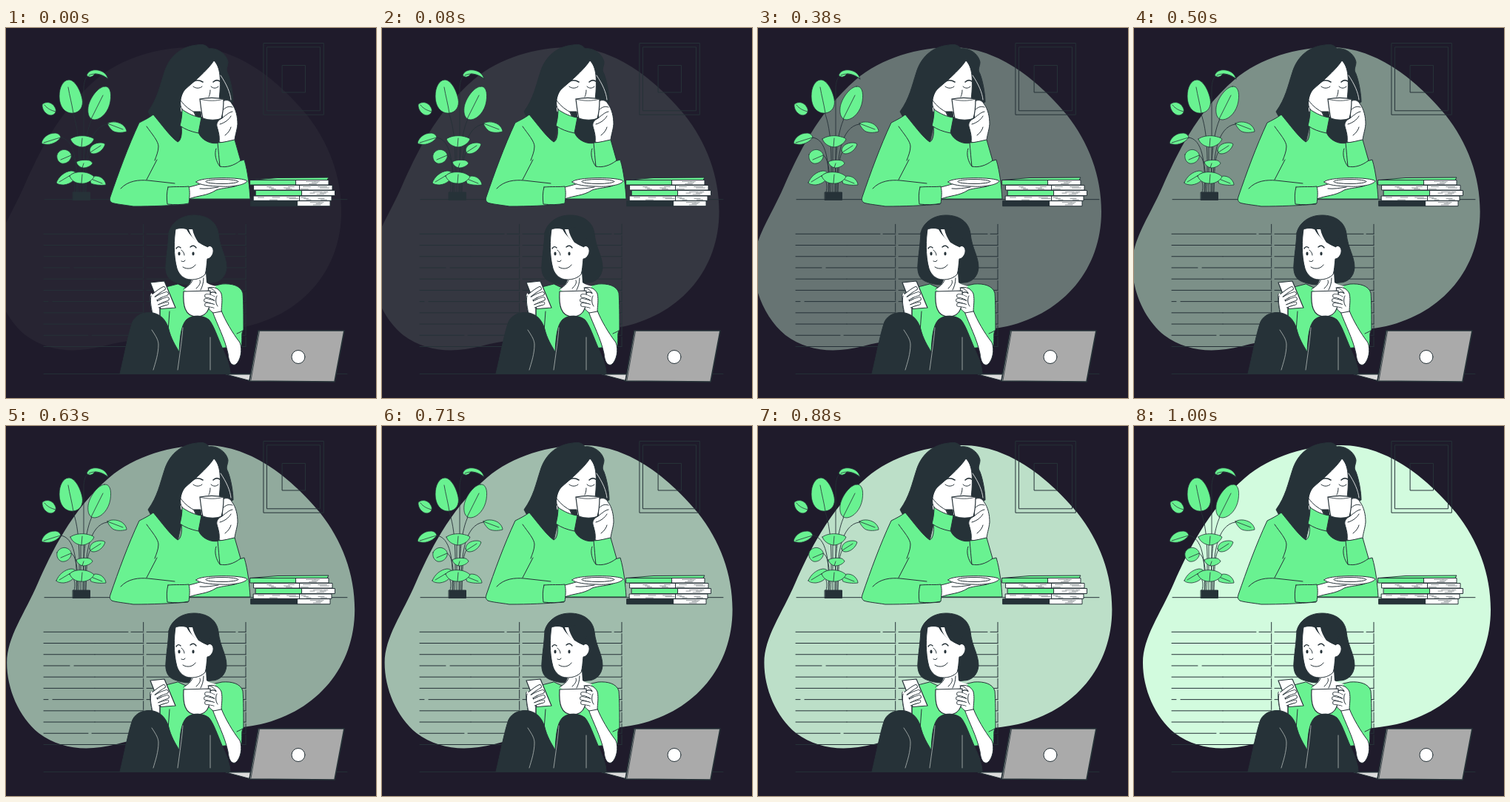
An HTML page with a canvas for the animation above (1.04 s loop, 500 by 500 pixels).

```html
<!DOCTYPE html>
<html lang="en">
<head>
<meta charset="utf-8">
<title>Coffee break</title>
<style>
html, body { margin: 0; width: 100%; height: 100%; overflow: hidden; background: #1f1b2b; }
canvas { display: block; width: 100vw; height: 100vh; }
</style>
</head>
<body>
<canvas id="stage"></canvas>
<script>
const NIGHT = '#1f1b2b', INK = '#263238', GREEN = '#69f291', MINT = '#d2fbde', WHITE = '#fff', GREY = '#aaa';
const LOOP = 1040, STEPS = 25, SLIDE = 30, SIZE = 500;

const stage = document.getElementById('stage');
const scale = Math.max(1, window.devicePixelRatio || 1);
stage.width = stage.height = SIZE * scale;
let ctx = stage.getContext('2d');
const screen = ctx;

const blob = new Path2D('M280 26C345 26 400 75 435 117C465 155 482 200 482 248C482 325 432 385 355 403' +
  'C300 414 215 415 160 430C120 440 85 437 55 415C28 393 12 355 12 320C12 285 36 254 54 212' +
  'C72 172 98 115 150 70C185 40 235 26 280 26Z');

function shape(d, fill, line = INK, width = 1) {
  const path = new Path2D(d);
  if (fill) { ctx.fillStyle = fill; ctx.fill(path); }
  if (line) { ctx.strokeStyle = line; ctx.lineWidth = width; ctx.stroke(path); }
}
const line = (d, color = INK, width = 1) => shape(d, null, color, width);

function oval(x, y, rx, ry, fill, stroke = INK) {
  ctx.beginPath();
  ctx.ellipse(x, y, rx, ry, 0, 0, 7);
  ctx.fillStyle = fill;
  ctx.fill();
  if (stroke) { ctx.strokeStyle = stroke; ctx.lineWidth = 1; ctx.stroke(); }
}

function box(x, y, w, h, fill) {
  shape(`M${x} ${y}h${w}v${h}h${-w}Z`, fill);
}

function finger(d, width = 5) {
  line(d, INK, width + 1.6);
  line(d, WHITE, width);
}

function leaf(d, rib) {
  shape(d, GREEN, INK, .8);
  line(rib, INK, .8);
}

function room() {
  box(348.3, 20.5, 81, 96.7);
  box(352.8, 25.8, 71.7, 86);
  box(373.5, 50.5, 31, 36.5);
  line('M52 231.7H461M51 467.4H461');

  const gaps = { 0: [165, 169], 3: [86, 92], 6: [57, 63], 9: [111, 116] };
  for (let i = 0; i < 11; i++) {
    const y = 278.3 + i * 15.22;
    const [a, b] = gaps[i] || [120, 120];
    line(`M51 ${y}H${a}M${b} ${y}H186`);
    line(i ? `M190 ${y}H324` : `M190 ${y}H310M314 ${y}H324`);
    line(`M185.7 ${y - 13}v11.5M324 ${y - 13}v13`);
  }
}

function plant() {
  line('M98 222C100 180 100 140 90 114M104 222C104 170 108 140 116 123M105 222V80C106 70 108 65 113 64' +
    'M95 222C97 180 92 150 74 148M107 222C106 175 112 133 137 130M108 222C109 200 108 176 114 168' +
    'M96 222C98 195 95 175 88 172M101 222V160M92 222C94 214 93 208 90 205', INK, .9);
  leaf('M109 64C111 57 120 55 128 58C134 60 137 65 138 69C133 65 126 62 120 62C117 66 113 68 109 64Z', 'M112 64C120 60 130 62 138 69');
  leaf('M84 70C92 69 100 82 103 96C105 106 100 114 91 115C81 116 72 108 72 92C72 80 77 71 84 70Z', 'M84 80C86 92 89 102 91 115');
  leaf('M133 79C140 78 143 86 141 99C139 112 130 123 120 124C112 124 110 116 111 107C113 95 124 80 133 79Z', 'M131 91L115 123');
  leaf('M49 103C55 98 63 101 66 107C69 112 67 117 61 118C54 118 48 110 49 103Z', 'M52 104C56 109 60 111 67 113');
  leaf('M137 129C143 125 154 127 159 132C162 135 163 138 163 140C156 142 147 142 143 138C140 135 138 132 137 129Z', 'M137 129L158 137');
  leaf('M48 155C50 148 57 142 66 142C70 142 73 144 74 148C70 154 60 159 52 157C50 157 48 156 48 155Z', 'M51 155C58 153 66 150 74 148');
  leaf('M87 150C92 146 101 145 108 146C113 147 117 148 119 150C117 156 109 161 102 161C95 160 89 156 87 150Z', 'M103 149L102 161');
  leaf('M113 166C113 159 120 155 128 155C131 155 133 156 134 157C132 164 125 170 118 170C115 170 113 168 113 166Z', 'M114 168L128 159');
  leaf('M69 171C71 166 77 163 82 165C87 167 89 171 88 175C86 181 80 184 75 183C70 181 68 176 69 171Z', 'M74 178L88 172');
  leaf('M95 181C99 178 108 178 113 179C115 180 117 182 117 183C114 187 109 189 104 189C99 188 96 185 95 181Z', 'M105 183L103 189');
  leaf('M68 209C71 201 79 194 88 193C92 193 94 195 95 197C95 204 88 211 78 212C73 212 69 211 68 209Z', 'M72 208L92 196');
  leaf('M113 203C119 198 127 200 131 204C134 207 135 210 135 212C128 213 119 212 115 210Z', 'M115 204L130 210');
  leaf('M86 200C90 195 98 194 106 195C113 196 117 199 119 201C116 207 108 211 101 210C94 210 88 206 86 200Z', 'M103 198L102 210');
  box(90.5, 222, 23, 10.5, INK);
}

function book(x, y, split, end, h, cover) {
  box(x, y, split - x, h, cover);
  box(split, y, end - split, h, WHITE);
  const from = cover === WHITE ? x : split;
  for (let i = 0; i < (end - from) / 11; i++) {
    const a = from + 3 + (i * 23 + y * 3) % (end - from - 17);
    line(`M${a} ${y + 2 + i % 3 * 1.6}h${6 + i % 4 * 2}`, INK, .5);
  }
}

function books() {
  shape('M330 205.5L367 202.5L436 202L434 205.5Z', GREEN);
  book(330, 205.5, 392, 436, 6.5, GREEN);
  book(335, 212.5, 397, 441, 6.5, WHITE);
  book(337.5, 219.5, 400, 444.5, 7, GREEN);
  book(334.5, 227, 397, 440, 6.3, WHITE);
  book(331, 233.7, 394, 438, 7, INK);
}

function sipper() {
  shape('M232 154C215 145 200 130 192 113C205 95 208 78 214 60C220 40 235 25 258 23C266 21 272 24 274 28' +
    'C285 26 298 35 300 46C300 53 296 55 300 62C304 72 307 90 307 100L296 105L290 130L288 155C275 159 264 152 258 142L238 130Z', INK);
  shape('M281 44C285 48 288 54 289 64C290 75 289 90 288 96L268 120L254 122L236 113C234 100 236 90 242 83C252 74 272 58 281 44Z', WHITE);
  shape('M254 113L263 113L264 122L257 120Z', INK);
  line('M240 84C235 95 234 103 238 110M236 98C242 106 249 111 255 114');
  line('M250 75C255 70 261 70 266 73M280 73C283 70 286 70 289 72', INK, 1.6);
  line('M253 79C256 82 262 82 265 79M277 79C280 82 284 82 287 79M276 84C276 88 275 91 274 93');
  line('M290 64C298 76 303 87 304 97', WHITE, .8);

  shape('M199 117C210 130 222 147 232 154C237 152 238 142 237 133L260 141C264 152 278 158 288 155L289 187' +
    'L322 178C327 195 329 215 330 231H247L246 238C220 240 200 241 172 241C160 239 148 238 143 236' +
    'C140 234 140 231 141 228C152 196 165 160 180 128C186 125 194 121 199 117Z', GREEN);
  shape('M238 110C246 116 256 120 264 121L260 142C250 140 242 137 235 132C237 125 238 117 238 110Z', GREEN);
  line('M190 133C197 143 206 153 206 160C206 167 203 173 201 179M204 178L190 205M155 217C165 206 180 205 192 206L228 210');
  line('M284 163C281 170 284 181 289 187');

  shape('M293 99C298 96 303 98 305 102C311 110 313 120 313 130C312 140 309 146 309 153C301 153 294 156 288 154C289 146 287 140 285 133C284 128 287 124 292 122Z', WHITE);
  shape('M286 155C294 155 303 152 309 151C312 160 314 170 317 179C308 186 298 189 289 187C288 178 287 165 286 155Z', GREEN);
  line('M293 111C297 107 301 105 306 107M291 122C297 119 300 114 306 113M289 130C296 128 301 124 304 119M296 145C300 142 303 138 304 134');
  shape('M262 96C272 94 284 94 294 96C294 106 293 116 291 122C285 125 274 125 266 122C264 114 263 104 262 96Z', WHITE, INK, 1.2);
  line('M262 96C272 99 285 99 294 96', INK, .8);

  shape('M247 215C256 213 262 211 268 209C280 212 300 212 312 213C305 216 292 216 284 219C272 227 260 226 247 231Z', WHITE);
  line('M262 217C270 218 279 216 287 215');
  shape('M257 208C260 201 322 201 326 207C323 212 306 215 291 214C275 214 261 212 257 208Z', WHITE);
  oval(292, 207.5, 22, 3, WHITE);
  shape('M219 215C230 214 240 215 247 214C249 221 248 230 247 237C238 239 228 239 218 238C217 230 217 222 219 215Z', GREEN);
}

function reader() {
  shape('M220 277C222 266 234 253 254 253C272 253 285 262 287 278C289 298 298 308 298 324C297 337 288 344 278 344' +
    'C260 346 245 350 228 343C218 340 215 330 216 320C217 305 219 295 220 277Z', INK);
  shape('M232 346C224 348 215 350 208 353L206 385L210 440L318 430C320 420 317 412 321 408C321 390 321 370 320 358' +
    'C317 348 305 345 292 346L283 348C270 353 255 357 245 352Z', GREEN);
  shape('M251 338L270 330L271 344C275 347 280 348 284 349C275 361 250 362 240 353C246 349 251 345 251 338Z', WHITE, null);
  shape('M229 272C234 270 240 270 245 272C250 282 261 290 272 295C276 293 281 296 280 303C279 308 275 312 272 312' +
    'C271 320 271 327 269 333C264 338 258 340 250 340C241 340 234 334 231 325C226 307 227 285 229 272Z', WHITE);
  shape('M244 271C249 282 260 291 273 296L277 284L262 269Z', INK);
  shape('M247 272C250 282 255 287 260 290C256 284 253 278 252 272Z', WHITE, null);
  oval(234, 305, 1.6, 2.4, INK, null);
  oval(253, 305, 1.6, 2.4, INK, null);
  line('M230 298C232 295 234 295 236 297M249 296C252 293 255 294 257 297', INK, 1.4);
  line('M237 300C239 302 241 304 241 307M239 323C245 327 253 325 256 320M237 315C239 316 241 316 242 314');
  line('M262 341C264 345 260 349 257 352M267 338C267 345 265 350 263 354M240 353C246 349 250 346 252 341');
  line('M221 383L219 410M312 413C316 411 319 410 321 408');

  // Hand with phone
  shape('M195 360C194 368 196 378 198 388L208 391V378L212 360Z', WHITE);
  shape('M195 344L214 342L229 378L209 379.5Z', WHITE, INK, 1.2);
  finger('M200 361C205 357 209 354 213 352', 4);
  finger('M202 366C208 362 213 360 217 359', 4);
  finger('M204 372C209 369 214 367 218 366', 4);
  finger('M206 376C211 374 215 373 218 372', 3);
  shape('M196 358C200 362 205 367 206 378L207 386L198 386C196 377 194 368 196 358Z', WHITE, null);
  line('M196 362C194 370 197 379 198 387M208 378V390');

  // Hand with mug
  shape('M279 383L291 382C296 395 306 412 316 425C320 435 317 450 310 455C304 457 301 450 300 440C296 420 285 400 279 383Z', WHITE);
  shape('M274 351C281 349 288 352 291 359C293 368 291 376 291 383L280 385C276 382 273 379 272 375Z', WHITE);
  shape('M240 356L276 355C277 374 275 390 258 390C241 390 239 374 240 356Z', WHITE, INK, 1.2);
  line('M276 358C282 355 286 359 285 365C284 371 280 374 276 375', INK, 1.2);
  finger('M284 367C280 364 275 362 271 362', 4);
  finger('M284 372C279 370 274 368 270 368', 4);
  finger('M284 377C279 375 275 374 271 374', 4);
  shape('M283 359L290 360L290 382L281 383Z', WHITE, null);
  line('M273 351C278 351 281 354 284 358M285 362C283 366 283 372 286 376');

  shape('M154 467C160 442 165 414 171 397C176 387 187 383 199 385C212 388 218 398 221 411C225 424 231 432 234 438' +
    'C235 420 236 402 244 394C252 387 266 388 274 394C280 400 286 418 293 434C299 447 303 458 303 467Z', INK);
  line('M197 408C203 417 206 422 206 428C206 440 202 452 199 462M239 405C238 420 235 440 232 462M276 418V462', '#b4bbb9', .8);
}

function laptop() {
  shape('M297 468H331L329 476.5Z', '#dcdcdc', INK, 1.2);
  shape('M341 409H457L444 478L329 477Z', GREY, INK, 1.6);
  line('M342.5 410L331 476', INK, .8);
  oval(395, 444.5, 9, 9, WHITE);
}

const scene = document.createElement('canvas');
scene.width = scene.height = stage.width;
ctx = scene.getContext('2d');
ctx.scale(scale, scale);
ctx.lineJoin = ctx.lineCap = 'round';
[room, plant, books, sipper, reader, laptop].forEach(part => part());
ctx = screen;

// 24 steps per second on a 10 ms clock; the first step holds twice as long
function stepAt(time) {
  const tick = Math.floor(time % LOOP / 10);
  const step = Math.min(STEPS - 1, Math.floor((tick + .49) * .24));
  return step < 2 ? 0 : step;
}

function draw(time) {
  const shown = (stepAt(time) + 1) / STEPS;
  ctx.setTransform(scale, 0, 0, scale, 0, 0);
  ctx.fillStyle = NIGHT;
  ctx.fillRect(0, 0, SIZE, SIZE);
  ctx.save();
  ctx.translate(-SLIDE * (1 - shown), 0);
  ctx.globalAlpha = shown;
  ctx.fillStyle = MINT;
  ctx.fill(blob);
  ctx.restore();
  ctx.drawImage(scene, 0, 0, SIZE, SIZE);
}

const start = performance.now();
function run() {
  draw(performance.now() - start);
  requestAnimationFrame(run);
}
run();
</script>
</body>
</html>
```
